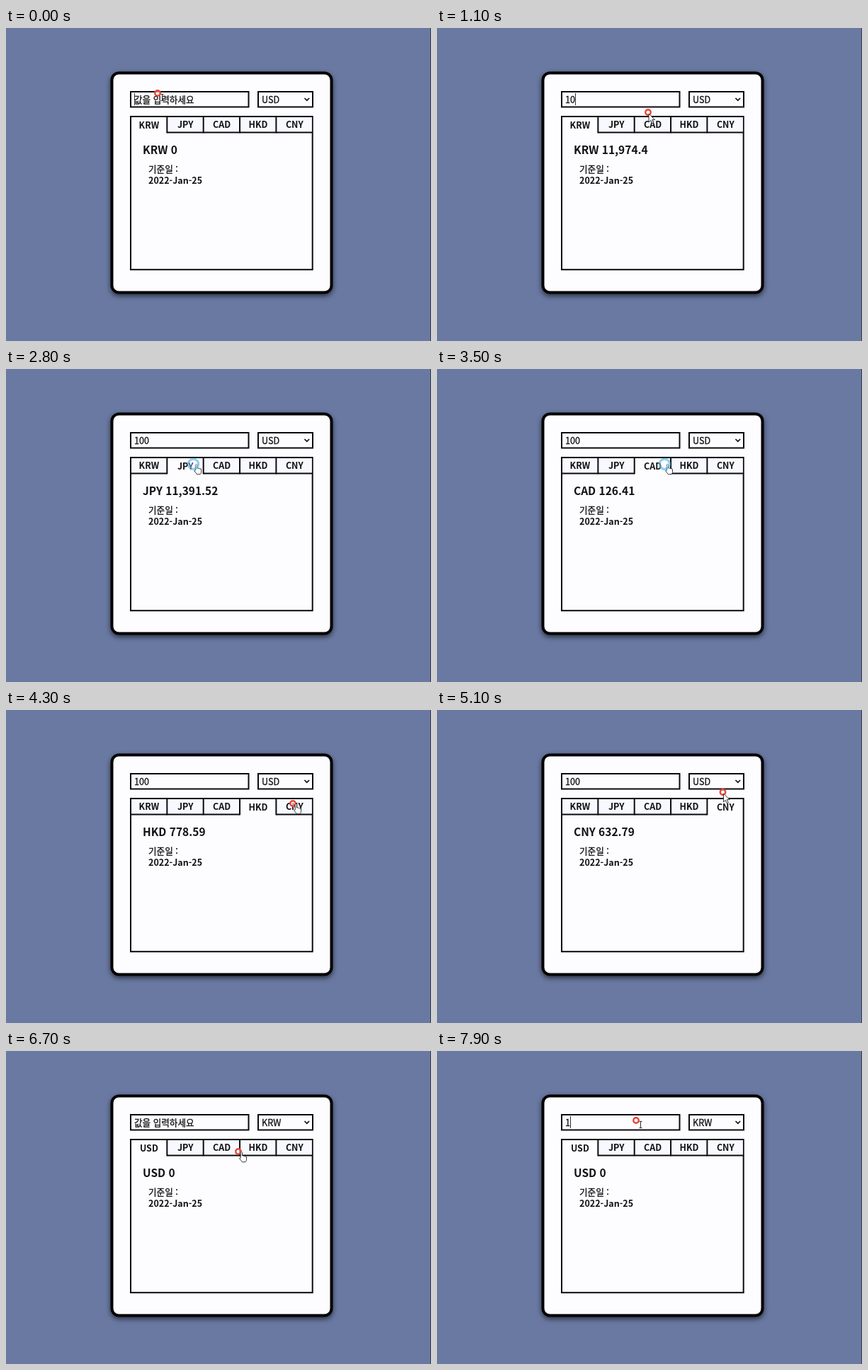
Write an HTML page that moves like this. It is 600 by 442 pixels and loops after 8000 ms.

```html
<!DOCTYPE html>
<html lang="ko">
<head>
<meta charset="utf-8">
<title>Currency converter</title>
<style>
  html, body { margin: 0; width: 100%; height: 100%; overflow: hidden; background: #6a79a2; }
  svg { display: block; width: 600px; height: 442px; }
  text { font: 500 12.6px "Noto Sans CJK KR", "Noto Sans CJK", "Noto Sans CJK JP", sans-serif; fill: #111; stroke: #111; stroke-width: .3; white-space: pre; }
  .bold, .result { font-weight: 700; font-size: 12.5px; stroke: none; }
  .result { font-size: 15.5px; }
  .tab { text-anchor: middle; }
  .hot { fill: #fff; stroke: #fff; }
  .box { fill: #fdfcff; stroke: #0b0b0d; stroke-width: 2; }
  .line { stroke: #0b0b0d; stroke-width: 2; }
  .icon { fill: #fff; stroke: #222; stroke-width: .9; }
  .card { filter: drop-shadow(0 3px 3.5px rgba(0, 0, 0, .6)); }
  .popup { filter: drop-shadow(1px 2px 2px rgba(0, 0, 0, .3)); }
</style>
</head>
<body>
<svg viewBox="0 0 600 442">
  <rect width="600" height="442" fill="#6a79a2"/>
  <rect x="599" width="1" height="442" fill="#343b50"/>
  <rect class="card" x="149.5" y="63.5" width="310" height="310" rx="10" fill="#fdfcff" stroke="#000" stroke-width="4"/>
  <rect class="box" x="176" y="90" width="166.5" height="21.5"/>
  <rect class="box" x="356" y="90" width="77" height="21.5"/>
  <path d="M421.5 99l3.3 3.3 3.3-3.3" fill="none" stroke="#111" stroke-width="1.7"/>
  <rect class="box" x="176" y="125" width="256.7" height="216.2"/>
  <g id="tabs"></g>
  <text id="input" x="181" y="106"></text>
  <rect id="caret" y="92" width="1" height="17" fill="#333"/>
  <text id="base" x="361" y="106.3"></text>
  <text id="result" class="result" x="193" y="178"></text>
  <text x="201" y="203.5">기준일 :</text>
  <text class="bold" x="201" y="220">2022-Jan-25</text>
  <g id="popup">
    <rect class="popup" x="355.5" y="113.5" width="78" height="114" fill="#fff" stroke="#777"/>
    <rect id="hover" x="356" width="77" height="18.8" fill="#1e90ff"/>
  </g>
  <g id="pointer">
    <circle id="spot" r="3.7" fill="#fff" fill-opacity=".6" stroke="#ea4335" stroke-width="2.4"/>
    <path id="arrow" class="icon" d="M1 2v12l2.8-2.6 2 4.4 2-.9-2-4.3h3.8z"/>
    <path id="hand" class="icon" d="M3.2 9V1.2q1.2-1.8 2.3 0V6q1.2-.8 2 .4 1.2-.6 2 .5 1.7-.6 2 1v3.6q-.2 2-1.5 3.2H5.4Q3.7 12.5 1.8 10q0-1.4 1.4-1z"/>
    <path id="beam" d="M4.5 1.5h4M6.5 1.5v9M4.5 10.5h4" fill="none" stroke="#333"/>
    <circle id="pulse" fill="#fff" fill-opacity=".45"/>
  </g>
</svg>
<script>
const LOOP = 8000, STEP = 100;
const CODES = ["USD", "KRW", "JPY", "CAD", "HKD", "CNY"];
const RATES = { KRW: 1197.4399, JPY: 113.9152, CAD: 1.2641, HKD: 7.7859, CNY: 6.3279 };
const TAB_WIDTH = 51.35, ROW = 18.8;

// Moments of the story, in ms
const TYPE = 1000, TYPED = 1300, POINT = 2100, TABS = 2600, TAB_EVERY = 700;
const OPEN = 5500, PICK = 6200, FOCUS = 7500, RETYPE = 7800;
const CLICKS = [POINT, OPEN, PICK, FOCUS, ...[0, 1, 2, 3].map(i => TABS + i * TAB_EVERY)];

// Pointer stops; it eases from one to the next
const STOPS = [
  { t: 0, x: 214, y: 92 }, { t: 400, x: 298, y: 119 }, { t: 1600, x: 298, y: 119 },
  { t: 1800, x: 392, y: 100 }, { t: POINT, x: 228, y: 119 }, { t: TABS, x: 256, y: 134 },
  { t: 3500, x: 321, y: 134 }, { t: 4300, x: 405, y: 132 }, { t: 4700, x: 407, y: 132 },
  { t: OPEN, x: 400, y: 100 }, { t: 5700, x: 390, y: 132 }, { t: PICK, x: 390, y: 133 },
  { t: 6700, x: 328, y: 142 }, { t: 7100, x: 371, y: 157 }, { t: FOCUS, x: 281, y: 98 },
  { t: LOOP, x: 281, y: 98 }
];

const $ = id => document.getElementById(id);
const clamp = (v, lo, hi) => Math.max(lo, Math.min(hi, v));
const show = (el, on) => el.setAttribute("visibility", on ? "inherit" : "hidden");
const set = (el, attrs) => { for (const k in attrs) el.setAttribute(k, attrs[k]); };

function add(parent, tag, attrs, text = "") {
  const el = document.createElementNS("http://www.w3.org/2000/svg", tag);
  set(el, attrs);
  el.textContent = text;
  return parent.appendChild(el);
}

const tabs = [0, 1, 2, 3, 4].map(i => {
  const x = 176 + i * TAB_WIDTH, parent = $("tabs");
  const fill = add(parent, "rect", { x: x + 1, y: 126, width: TAB_WIDTH - 2, height: 21, fill: "#f7f9ff" });
  const line = add(parent, "path", { d: `M${x} 147.4h${TAB_WIDTH}`, class: "line" });
  add(parent, "path", { d: `M${x} 125v23.4`, class: "line" });
  return { fill, line, label: add(parent, "text", { x: x + 25.9, class: "bold tab" }) };
});
const options = CODES.map((code, i) => add($("popup"), "text", { x: 359, y: 128 + i * ROW }, code));

function pointerAt(t) {
  const i = STOPS.findIndex(s => s.t > t), a = STOPS[i - 1], b = STOPS[i];
  const k = (t - a.t) / (b.t - a.t), e = k * k * (3 - 2 * k);
  return { x: a.x + (b.x - a.x) * e, y: a.y + (b.y - a.y) * e };
}

function typedText(t) {
  if (t >= PICK) return t < RETYPE ? "" : "1";
  return t < TYPE ? "" : "100".slice(0, 1 + Math.round((t - TYPE) / 150));
}

function caretOn(t) {
  const since = t >= FOCUS ? FOCUS : t >= TYPED ? TYPED : -200;
  return (t < TABS || t >= FOCUS) && Math.floor((t - since) / 500) % 2 === 0;
}

function activeTab(t) {
  return t < TABS || t >= PICK ? 0 : Math.min(4, 1 + Math.floor((t - TABS) / TAB_EVERY));
}

function drawPointer(t, open) {
  const { x, y } = pointerAt(t), px = x + 3, py = y + 3;
  const inside = (l, top, r, bottom) => px > l && px < r && py > top && py < bottom;
  const shape = open ? "arrow" : inside(175, 89, 343, 112) ? "beam" : inside(175, 125, 434, 149) ? "hand" : "arrow";
  $("pointer").setAttribute("transform", `translate(${x} ${y})`);
  for (const id of ["arrow", "hand", "beam"]) show($(id), id === shape);

  // A click ring starts small beside the pointer, then settles on it, grows and fades
  const click = CLICKS.find(c => t >= c && t < c + 300);
  const age = (t - click) / 300, aside = (1 - age) ** 3;
  show($("spot"), !(age > 0));
  show($("pulse"), age >= 0);
  if (age >= 0) set($("pulse"), {
    cx: 9 * aside, cy: 5 * aside, r: 3.8 + 5 * age,
    stroke: `hsl(202 75% ${48 + 25 * age}%)`, "stroke-width": 2.6 + age, opacity: 1 - age * .5
  });

  const hover = clamp(Math.floor((py - 114) / ROW), 0, 5);
  $("hover").setAttribute("y", 114 + hover * ROW);
  options.forEach((el, i) => el.classList.toggle("hot", i === hover));
}

function draw(t) {
  const base = t < PICK ? "USD" : "KRW", open = t >= OPEN && t < PICK;
  const value = typedText(t), active = activeTab(t);
  const codes = CODES.filter(c => c !== base);
  tabs.forEach(({ fill, line, label }, i) => {
    show(fill, i !== active);
    show(line, i !== active);
    label.textContent = codes[i];
    label.setAttribute("y", i === active ? 142.3 : 141);
  });
  const amount = base === "USD" ? value * RATES[codes[active]] : value / RATES.KRW;
  $("result").textContent = codes[active] + " " + amount.toLocaleString("en-US", { maximumFractionDigits: 2 });
  $("input").textContent = value || "값을 입력하세요";
  $("base").textContent = base;
  show($("caret"), caretOn(t));
  $("caret").setAttribute("x", 181 + value.length * 7);
  show($("popup"), open);
  drawPointer(t, open);
}

const start = performance.now();
function tick() {
  const t = (performance.now() - start) % LOOP;
  draw(Math.floor(t / STEP) * STEP);
  requestAnimationFrame(tick);
}
tick();
</script>
</body>
</html>
```
